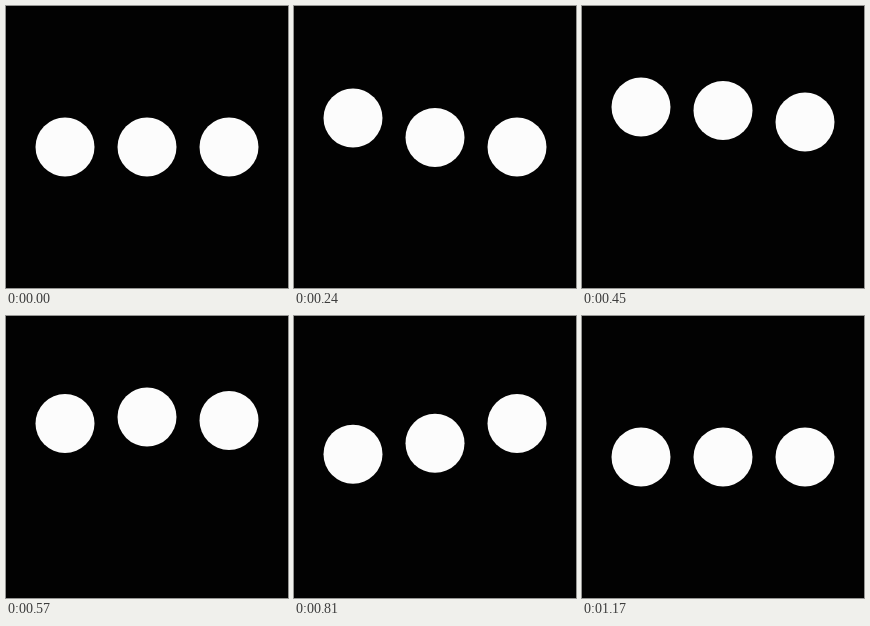
An HTML page that plays this animation: 282 px wide and 282 px high, repeating every 1200 ms.

```html
<!DOCTYPE html>
<html lang="en">
<head>
<meta charset="utf-8">
<title>Bouncing dots</title>
<style>
  html, body { margin: 0; width: 100%; height: 100%; overflow: hidden; background: #020202; }
  svg { display: block; width: 100vw; height: 100vh; fill: #fcfcfc; }
</style>
</head>
<body>
<svg viewBox="0 0 282 282">
  <circle cx="59" cy="141" r="29.5"/>
  <circle cx="141" cy="141" r="29.5"/>
  <circle cx="223" cy="141" r="29.5"/>
</svg>
<script>
const LOOP = 1200, RISE = 470, DELAY = 120, REST_Y = 141, HEIGHT = 40;
const dots = document.querySelectorAll('circle');

// cubic-bezier(0.35, 0, 0.34, 1), solved by bisection
function ease(x) {
  if (x <= 0) return 0;
  if (x >= 1) return 1;
  let lo = 0, hi = 1, t;
  for (let i = 0; i < 24; i++) {
    t = (lo + hi) / 2;
    const bx = 3 * (1 - t) * t * ((1 - t) * 0.35 + t * 0.34) + t ** 3;
    if (bx < x) lo = t; else hi = t;
  }
  return t * t * (3 - 2 * t);
}

function draw() {
  const time = performance.now() % LOOP;
  dots.forEach((dot, i) => {
    const phase = (time - i * DELAY) / RISE;
    const lift = ease(phase) - ease(phase - 1);
    dot.setAttribute('cy', REST_Y - HEIGHT * lift);
  });
  requestAnimationFrame(draw);
}
draw();
</script>
</body>
</html>
```
